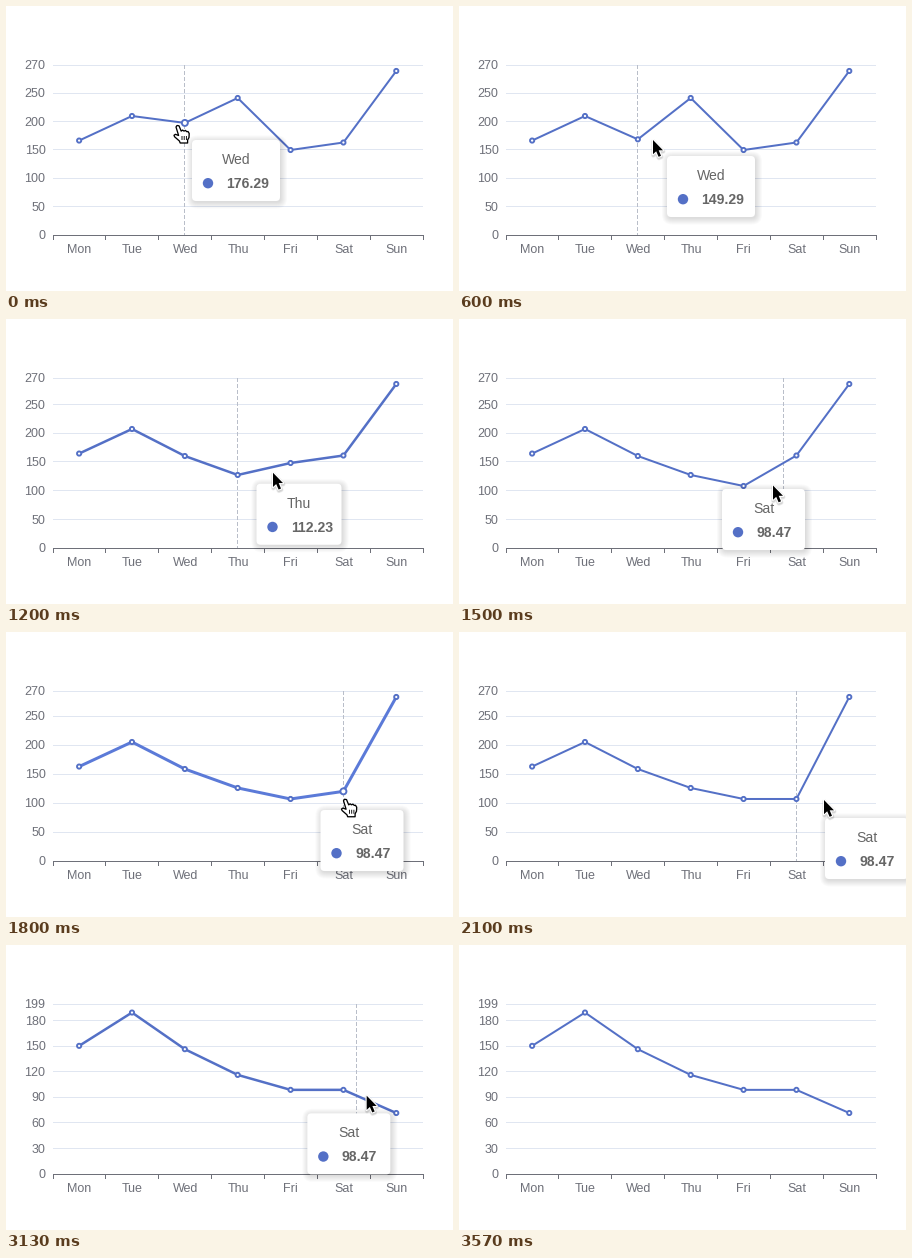
Animation of 447 by 285 pixels, one loop 4.17 s. Source, as a matplotlib script:

```python
import numpy as np
import matplotlib.pyplot as plt
from matplotlib.animation import FuncAnimation
from matplotlib.patches import Circle, FancyBboxPatch, Polygon

W, H, DPI = 447, 285, 64
PX = 72 / DPI                       # points per pixel
TICK, FRAMES = 30, 139
HOLD = 148.9                        # ms each pose is held
LAST = 24                           # pose that rests until the loop restarts
RESCALE = 15                        # pose at which the value axis shrinks

LEFT, RIGHT, TOP, BASE = 47, 417, 59, 229
DAYS = ["Mon", "Tue", "Wed", "Thu", "Fri", "Sat", "Sun"]
SLOT = (RIGHT - LEFT) / len(DAYS)
BLUE, LIFTED = "#5470c6", "#5b7ad8"
GRID, INK, DASH, TIP_INK = "#e0e6f1", "#6e7079", "#b9bec9", "#666666"

START = [150, 189, 178, 217.6, 135, 146.9, 260.5]
# day: (first pose, last pose, final value)
DRAGS = {2: (0, 7, 146.1), 3: (4, 8, 116), 4: (8, 10, 98.5),
         5: (10, 14, 98.5), 6: (14, 16, 71.4)}
HOVERS = {2: (0, 2), 3: (5, 7), 5: (11, 12), 6: (15, 20)}
HOPS = [(4, 6), (8, 9), (9, 11), (14, 15)]      # axis pointer, one day each
# pose, cursor x, y, tooltip x, y
PATH = np.array([(0, 172, 119.5, 186, 134), (4, 194, 134, 208, 150),
                 (6, 220, 141, 238, 159.5), (10, 314, 166.5, 263, 170),
                 (14, 365, 168, 366, 186), (16, 370, 169, 274, 187.5),
                 (20, 370, 169, 274, 187.5), (23, 342, 114, 356, 130)])
# pose, tooltip value
READOUT = np.array([(0, 176.29), (4, 149.29), (6, 139.76), (9, 98.47),
                    (14, 98.47), (16, 71.41), (20, 71.41), (21, 98.47)])

ARROW = np.array([(0, 0), (0, 14.2), (3.2, 11.3), (5.6, 16.8), (8, 15.8),
                  (5.7, 10.3), (10, 10.3)])
HAND = np.array([(-2, 1.5), (-1, 0), (1, 0.3), (3.2, 5.6), (4.6, 4.6),
                 (6, 5.6), (7.4, 4.9), (8.8, 6.2), (10, 6), (11.2, 8),
                 (11, 12), (9.6, 14.5), (9.6, 17.5), (2.2, 17.5), (1.4, 15.5),
                 (-3.4, 11.3), (-4, 9.8), (-2.6, 8.8), (0.6, 10)])

plt.rcParams["font.family"] = "Liberation Sans"
fig = plt.figure(figsize=(W / DPI, H / DPI), dpi=DPI, facecolor="white")
ax = fig.add_axes([0, 0, 1, 1])


def ease(step, first, last):
    t = np.clip((step - first) / (last - first), 0, 1)
    return 1 - (1 - t) ** 2


def along(keys, step):
    return np.array([np.interp(step, keys[:, 0], col) for col in keys.T[1:]])


def center(i):
    return LEFT + SLOT * (i + 0.5) - 0.3


def pixel(v):
    return np.floor(v) + 0.5


def value_at(day, step):
    if day not in DRAGS:
        return START[day]
    first, last, final = DRAGS[day]
    return START[day] + (final - START[day]) * ease(step, first, last)


def hovered(day, step):
    first, last = HOVERS.get(day, (LAST + 1, LAST))
    return first <= step <= last


def line_width(step):
    """Thicken after a hover starts, thin out after it ends."""
    lift = [min(1, step - a, (b + 2 - step) / 2) for a, b in HOVERS.values()]
    return 2 + max(0, *lift)


def pointer_at(step):
    return 2 + sum(ease(step, *hop) for hop in HOPS) - ease(step, 20, 22)


def line(xs, ys, color, width=1, **kw):
    ax.plot(xs, ys, color=color, lw=width * PX, snap=False,
            solid_capstyle="butt", **kw)


def text(x, y, s, size, color=INK, **kw):
    ax.text(x, y, s, fontsize=size * PX, color=color, va="baseline", **kw)


def shape(points, fc, **kw):
    ax.add_patch(Polygon(points, fc=fc, joinstyle="round", **kw))


def draw_axes(step):
    if step < RESCALE:
        gap = 28.4 + 0.3 * (step // 6)
        marks = [(50 * i, BASE - gap * i) for i in range(6)] + [(270, TOP)]
    else:
        marks = [(v, BASE - 170 * v / 199) for v in range(0, 181, 30)]
        late = min(1, (step - RESCALE) / 4) ** 2
        marks[5] = (150, 142 - 41 * late)
        marks.append((199, TOP))
    for value, y in marks:
        if value:
            line([LEFT, RIGHT], [pixel(y)] * 2, GRID, zorder=1)
        text(39.5, y + 4.3, str(value), 12.5, ha="right", zorder=2)

    line([LEFT, RIGHT + 1], [pixel(BASE)] * 2, INK, zorder=2)
    for i in range(len(DAYS) + 1):
        line([pixel(LEFT + SLOT * i)] * 2, [BASE, BASE + 5], INK, zorder=2)
    for i, day in enumerate(DAYS):
        text(center(i) + 0.3, 247.3, day, 12.5, ha="center", zorder=2)


def draw_series(step):
    top = 270 if step < RESCALE else 199
    xs = [center(i) for i in range(len(DAYS))]
    ys = [BASE - 170 * value_at(i, step) / top for i in range(len(DAYS))]
    width = line_width(step)
    line(xs, ys, LIFTED if width > 2.5 else BLUE, width, zorder=4,
         solid_joinstyle="bevel")
    for i, point in enumerate(zip(xs, ys)):
        radius = 3 if hovered(i, step) else 2.1
        ax.add_patch(Circle(point, radius, fc="white", ec=BLUE,
                            lw=1.9 * PX, zorder=5))


def draw_pointer(step):
    line([pixel(center(pointer_at(step)))] * 2, [TOP, BASE], DASH, zorder=3,
         dashes=(4, 2), dash_capstyle="butt")


def rounded(x, y, w, h, radius, **kw):
    style = f"round,pad=0,rounding_size={radius}"
    ax.add_patch(FancyBboxPatch((x, y), w, h, ec="none", boxstyle=style, **kw))


def draw_tooltip(step, x, y):
    label = f"{along(READOUT, step)[0]:.2f}"
    w = 47 + sum({"1": 5, ".": 4}.get(c, 8) for c in label)
    h = 61
    for grow in range(7):
        rounded(x + 1 - grow, y + 1.5 - grow, w + 2 * grow, h + 2 * grow,
                4 + grow, fc="black", alpha=0.018, zorder=6)
    rounded(x, y, w, h, 4, fc="white", zorder=7)
    text(x + w / 2, y + 24, DAYS[round(pointer_at(step))], 14, TIP_INK,
         ha="center", zorder=8)
    text(x + 34.6, y + 48, label, 14, TIP_INK, weight="bold", zorder=8)
    ax.add_patch(Circle((x + 16, y + 43.2), 5.2, fc=BLUE, ec="none", zorder=8))


def draw_cursor(step, tip):
    dragging = any(hovered(day, step) and step < last
                   for day, (_, last, _) in DRAGS.items())
    if dragging:
        shape(tip + HAND, "white", ec="black", lw=1.3 * PX, zorder=11)
        for dx in (4, 6.2, 8.4):
            line([tip[0] + dx] * 2, [tip[1] + 10.5, tip[1] + 14.5],
                 "black", 0.9, zorder=12)
        return
    for width, alpha in ((4.5, 0.07), (3, 0.1)):
        shape(tip + ARROW + (0.3, 1.3), "black", ec="black", lw=width * PX,
              alpha=alpha, zorder=10)
    shape(tip + ARROW, "white", ec="white", lw=2.4 * PX, zorder=11)
    shape(tip + ARROW, "black", ec="none", zorder=12)


def draw(frame):
    step = min(LAST, int((frame + 0.5) * TICK / HOLD))
    ax.clear()
    ax.set(xlim=(0, W), ylim=(H, 0))
    ax.axis("off")
    draw_axes(step)
    draw_series(step)
    if step < 22:
        draw_pointer(step)
    if step < LAST:
        spot = along(PATH, step)
        draw_tooltip(step, *spot[2:])
        draw_cursor(step, spot[:2])
    return []


anim = FuncAnimation(fig, draw, frames=FRAMES, interval=TICK, repeat=True,
                     repeat_delay=0, init_func=lambda: draw(0), blit=False)
plt.show()
```
